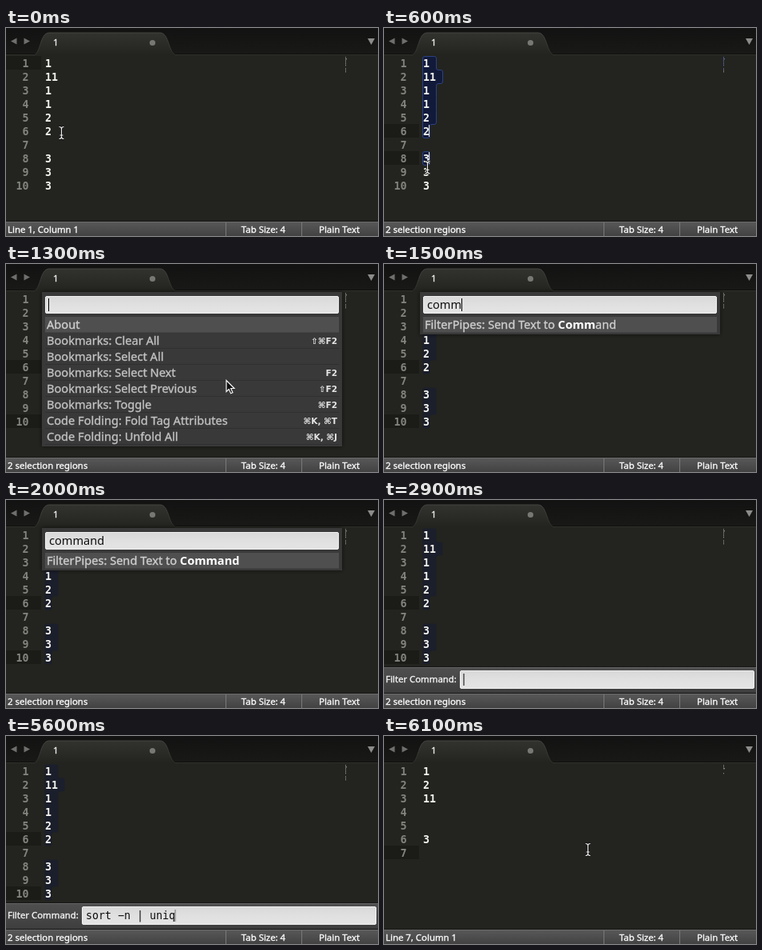
Animation, 466 px wide and 260 px high, one loop 7000 ms. Source, as an HTML page with a canvas:

```html
<!DOCTYPE html>
<html lang="en">
<head>
<meta charset="utf-8">
<title>Filter command demo</title>
<style>
  html, body { margin: 0; width: 100%; height: 100%; overflow: hidden; background: #23241f; }
  canvas { display: block; width: 466px; height: 260px; }
</style>
</head>
<body>
<canvas id="stage" width="466" height="260"></canvas>
<script>
const ctx = document.getElementById('stage').getContext('2d');
const LOOP = 7000, STEP = 100;
const W = 466, ROW = 17, TOP = 35, LEFT = 49, CHAR = 8;
const MONO = '"DejaVu Sans Mono", monospace';
const UI = '"Noto Sans", "Open Sans", sans-serif';
const KEYS = '"DejaVu Sans", sans-serif';
const SMALL = '11.4px ' + UI, LARGE = '14.6px ' + UI;
const CODE = '13.3px ' + MONO;

const BEFORE = ['1', '11', '1', '1', '2', '2', '', '3', '3', '3'];
const AFTER = ['1', '2', '11', '', '', '3', ''];
const ITEMS = [
  ['About', ''],
  ['Bookmarks: Clear All', '⇧⌘F2'],
  ['Bookmarks: Select All', ''],
  ['Bookmarks: Select Next', 'F2'],
  ['Bookmarks: Select Previous', '⇧F2'],
  ['Bookmarks: Toggle', '⌘F2'],
  ['Code Folding: Fold Tag Attributes', '⌘K, ⌘T'],
  ['Code Folding: Unfold All', '⌘K, ⌘J']
];
const SEND = ['FilterPipes: Send Text to Command', ''];
const COMMAND = 'sort −n | uniq';

// Pointer stops: step, x, y
const PATH = [[0, 69, 131], [2, 69, 131], [4, 50, 163], [5, 50, 163],
  [8, 62, 197], [9, 76, 194], [11, 276, 150], [13, 276, 150]];

function rect(x, y, w, h, fill) {
  ctx.fillStyle = fill;
  ctx.fillRect(x, y, w, h);
}

function text(s, x, y, font, fill, align = 'left') {
  ctx.font = font;
  ctx.fillStyle = fill;
  ctx.textAlign = align;
  ctx.fillText(s, x, y);
}

// Interface labels are slightly heavier than regular weight
function label(s, x, y, font, fill, align) {
  text(s, x, y, font, fill, align);
  ctx.strokeStyle = fill;
  ctx.lineWidth = .35;
  ctx.strokeText(s, x, y);
}

function shade(y0, y1, ...colors) {
  const g = ctx.createLinearGradient(0, y0, 0, y1);
  colors.forEach((c, i) => g.addColorStop(i / (colors.length - 1), c));
  return g;
}

function polygon(points, fill) {
  ctx.beginPath();
  points.forEach(([x, y]) => ctx.lineTo(x, y));
  ctx.closePath();
  ctx.fillStyle = fill;
  ctx.fill();
}

function roundPath(points, r) {
  const n = points.length;
  const [a, b] = [points[n - 1], points[0]];
  ctx.beginPath();
  ctx.moveTo((a[0] + b[0]) / 2, (a[1] + b[1]) / 2);
  points.forEach((p, i) => {
    const q = points[(i + 1) % n];
    ctx.arcTo(p[0], p[1], q[0], q[1], r);
  });
  ctx.closePath();
}

function caret(x, y, h, color, alpha) {
  ctx.globalAlpha = alpha;
  rect(x, y, 1, h, color);
  ctx.globalAlpha = 1;
}

function drawTabs() {
  rect(0, 0, W, 34, shade(0, 34, '#121212', '#191917'));
  rect(0, 32, W, 1, '#10100f');
  rect(0, 33, W, 1, '#2f302b');
  ctx.beginPath();
  ctx.moveTo(34, 34);
  ctx.bezierCurveTo(44, 33, 42, 6, 54, 6);
  ctx.lineTo(193, 6);
  ctx.bezierCurveTo(205, 6, 203, 33, 214, 34);
  ctx.fillStyle = shade(6, 34, '#32332f', '#23241f');
  ctx.fill();
  ctx.strokeStyle = shade(6, 34, '#43443f', '#30312c');
  ctx.lineWidth = 1;
  ctx.stroke();
  label('1', 59, 22, SMALL, '#f0f0f0');
  ctx.beginPath();
  ctx.arc(183.5, 18.5, 3.6, 0, 7);
  ctx.fillStyle = '#777774';
  ctx.fill();
  polygon([[6, 16.5], [13.5, 12.5], [13.5, 20.5]], '#6f6f6d');
  polygon([[30, 16.5], [22.5, 12.5], [22.5, 20.5]], '#6f6f6d');
  polygon([[453, 13], [462, 13], [457.5, 21]], '#8c8c8a');
}

function selections(k) {
  if (k < 1 || k > 60) return [];
  if (k >= 58) return [[0, 3, 0], [5, 6, 0]];
  const first = [0, 5, 1];
  if (k < 5) return [first];
  const second = k === 5 ? [7, 7, 0] : [7, Math.min(k + 1, 9), 1];
  return [first, second];
}

function drawSelection([from, to, col], lines, focused) {
  const points = [[LEFT - .5, TOP + from * ROW + .5]];
  let bottom = points[0][1];
  for (let i = from; i <= to; i++) {
    const cells = i < to ? lines[i].length + 1 : col;
    if (!cells) break;
    const x = LEFT + cells * CHAR + .5;
    points.push([x, bottom], [x, bottom + ROW]);
    bottom += ROW;
  }
  if (points.length < 2) return;
  points.push([LEFT - .5, bottom]);
  roundPath(points, 2.5);
  ctx.fillStyle = focused ? '#121a3a' : '#1b1e2b';
  ctx.fill();
  if (focused) {
    ctx.strokeStyle = '#2c4183';
    ctx.lineWidth = 1;
    ctx.stroke();
  }
}

function drawEditor(k) {
  const lines = k < 58 ? BEFORE : AFTER;
  const focused = k < 13 || k >= 58;
  const sels = selections(k);
  const active = sels.length ? sels.map(s => s[1]) : [k < 1 ? 0 : 6];
  active.forEach(i => rect(0, TOP + i * ROW, 44, ROW, '#1b1c18'));
  sels.forEach(s => drawSelection(s, lines, focused));
  lines.forEach((line, i) => {
    const y = 48.5 + i * ROW;
    text(i + 1, 28.5, y, 'bold ' + CODE, '#83847e', 'right');
    text(line, LEFT, y, 'bold ' + CODE, '#f6f6f0');
    const picked = focused && sels.some(s => i >= s[0] && i <= s[1]);
    rect(425, 36 + 2 * i, line.length, 1.4, picked ? '#5a62a8' : '#85867f');
  });
  if (focused) {
    sels.forEach(([, row, col]) =>
      caret(LEFT + col * CHAR - (col ? 1 : 0), TOP + row * ROW + 1, 15, '#f8f8f0', .9));
  }
}

function drawField(x, y, w, h) {
  ctx.beginPath();
  ctx.roundRect(x, y, w, h, 1.5);
  ctx.fillStyle = shade(y, y + h, '#d8d8d8', '#e0e0e0', '#e4e4e4');
  ctx.fill();
  ctx.strokeStyle = '#efefef';
  ctx.lineWidth = 1;
  ctx.stroke();
}

// Matched part of an entry is bold and brighter
function drawEntry(name, query, y, bright) {
  const at = query ? name.toLowerCase().lastIndexOf(query) : -1;
  const start = at < 0 ? name.length : at;
  const end = start + query.length;
  const plain = bright ? '#cfcfcf' : '#c2c2c2';
  let x = 51;
  const add = (s, draw, font, fill) => {
    draw(s, x, y, font, fill);
    x += ctx.measureText(s).width;
  };
  add(name.slice(0, start), label, LARGE, plain);
  add(name.slice(start, end), text, 'bold ' + LARGE, '#fff');
  add(name.slice(end), label, LARGE, plain);
}

function drawPalette(k) {
  const query = 'command'.slice(0, [0, 2, 4][k - 13] ?? 7);
  const items = query.length < 4
    ? ITEMS.filter(([s]) => !query || s.toLowerCase().startsWith(query))
    : [SEND];
  const h = 33 + items.length * 20;
  ctx.shadowColor = 'rgba(0,0,0,.6)';
  ctx.shadowBlur = 5;
  rect(45, 35, 376, h, '#393939');
  ctx.shadowBlur = 0;
  ctx.shadowColor = 'transparent';
  drawField(49.5, 40.5, 367, 21);
  text(query, 54, 56, LARGE, '#111');
  const x = 53 + Math.ceil(ctx.measureText(query).width);
  const alpha = k < 17 ? 1 : Math.max(0, 1 - (k - 16) / 4);
  caret(x, 43, 16, '#000', alpha);
  items.forEach(([name, keys], i) => {
    const y = 66 + i * 20;
    rect(49, y, 368, 20, i ? '#393939' : '#4f4f4f');
    rect(49, y + 19, 368, 1, i ? '#303030' : '#444');
    drawEntry(name, query, y + 15, !i);
    text(keys, 415, y + 14, 'bold 10.5px ' + KEYS, '#e4e4e4', 'right');
  });
}

function panelCaret(k) {
  if (k < 44) return 1;
  if (k < 54) return Math.max(0, 1 - (k - 43) / 5);
  return [.15, .3, .5][k - 54] ?? .5;
}

function drawPanel(k) {
  const drop = k === 28 ? 16 : k === 57 ? 18 : 0;
  const typed = k < 31 ? 0 : k < 33 ? k - 30 : k - 29;
  const s = COMMAND.slice(0, typed);
  ctx.save();
  ctx.translate(0, drop);
  rect(0, 208, W, 34, shade(208, 242, '#505050', '#3d3d3d'));
  rect(0, 208, W, 1, '#181818');
  rect(0, 209, W, 1, '#636363');
  label('Filter Command:', 2, 228, SMALL, '#f4f4f4');
  drawField(95.5, 213.5, 368, 22);
  text(s, 100, 229, CODE, '#0c0c0c');
  caret(99.5 + s.length * CHAR, 217, 15, '#000', panelCaret(k));
  ctx.restore();
}

function statusText(k) {
  if (k < 1) return 'Line 1, Column 1';
  if (k < 5) return '6 lines, 12 characters selected';
  return k < 61 ? '2 selection regions' : 'Line 7, Column 1';
}

function drawStatus(k) {
  rect(0, 241, W, 19, shade(242, 260, '#5a5959', '#434242'));
  rect(0, 241, W, 1, '#161616');
  rect(0, 242, W, 1, '#6b6a6a');
  [275, 370].forEach(x => rect(x, 243, 1, 17, '#7a7979'));
  label(statusText(k), 2, 256, SMALL, '#fafafa');
  label('Tab Size: 4', 322.5, 256, SMALL, '#fafafa', 'center');
  label('Plain Text', 417.5, 256, SMALL, '#fafafa', 'center');
}

function beam(x, y) {
  const trace = (color, width) => {
    ctx.beginPath();
    for (const s of [-1, 1]) {
      ctx.moveTo(x - 3, y + s * 7.5);
      ctx.quadraticCurveTo(x, y + s * 7.5, x, y + s * 5);
      ctx.quadraticCurveTo(x, y + s * 7.5, x + 3, y + s * 7.5);
    }
    ctx.moveTo(x, y - 6);
    ctx.lineTo(x, y + 6);
    ctx.moveTo(x - 2, y + 3);
    ctx.lineTo(x + 2, y + 3);
    ctx.strokeStyle = color;
    ctx.lineWidth = width;
    ctx.stroke();
  };
  trace('#111', 3);
  trace('#eee', 1.2);
}

function arrow(x, y) {
  const shape = [[0, 0], [0, 14], [3.2, 11], [5.6, 16.3], [8, 15.2], [5.7, 10], [10, 10]]
    .map(([a, b]) => [x + a, y + b]);
  polygon(shape, '#111');
  ctx.strokeStyle = '#f4f4f4';
  ctx.lineWidth = 1.2;
  ctx.stroke();
}

function drawPointer(k) {
  if (k >= 59) return beam(255.5, 142);
  if (k > 13) return;
  if (k === 13) return arrow(276, 145.5);
  const i = PATH.findIndex(p => p[0] > k);
  const [a, b] = [PATH[i - 1], PATH[i]];
  const f = (k - a[0]) / (b[0] - a[0]);
  beam(a[1] + (b[1] - a[1]) * f + .5, a[2] + (b[2] - a[2]) * f);
}

function draw(k) {
  rect(0, 0, W, 260, '#23241f');
  drawTabs();
  drawEditor(k);
  if (k >= 13 && k < 28) drawPalette(k);
  if (k >= 28 && k < 58) drawPanel(k);
  drawStatus(k);
  drawPointer(k);
}

const start = performance.now();
function frame() {
  draw(Math.floor(((performance.now() - start) % LOOP) / STEP));
  requestAnimationFrame(frame);
}
frame();
</script>
</body>
</html>
```
